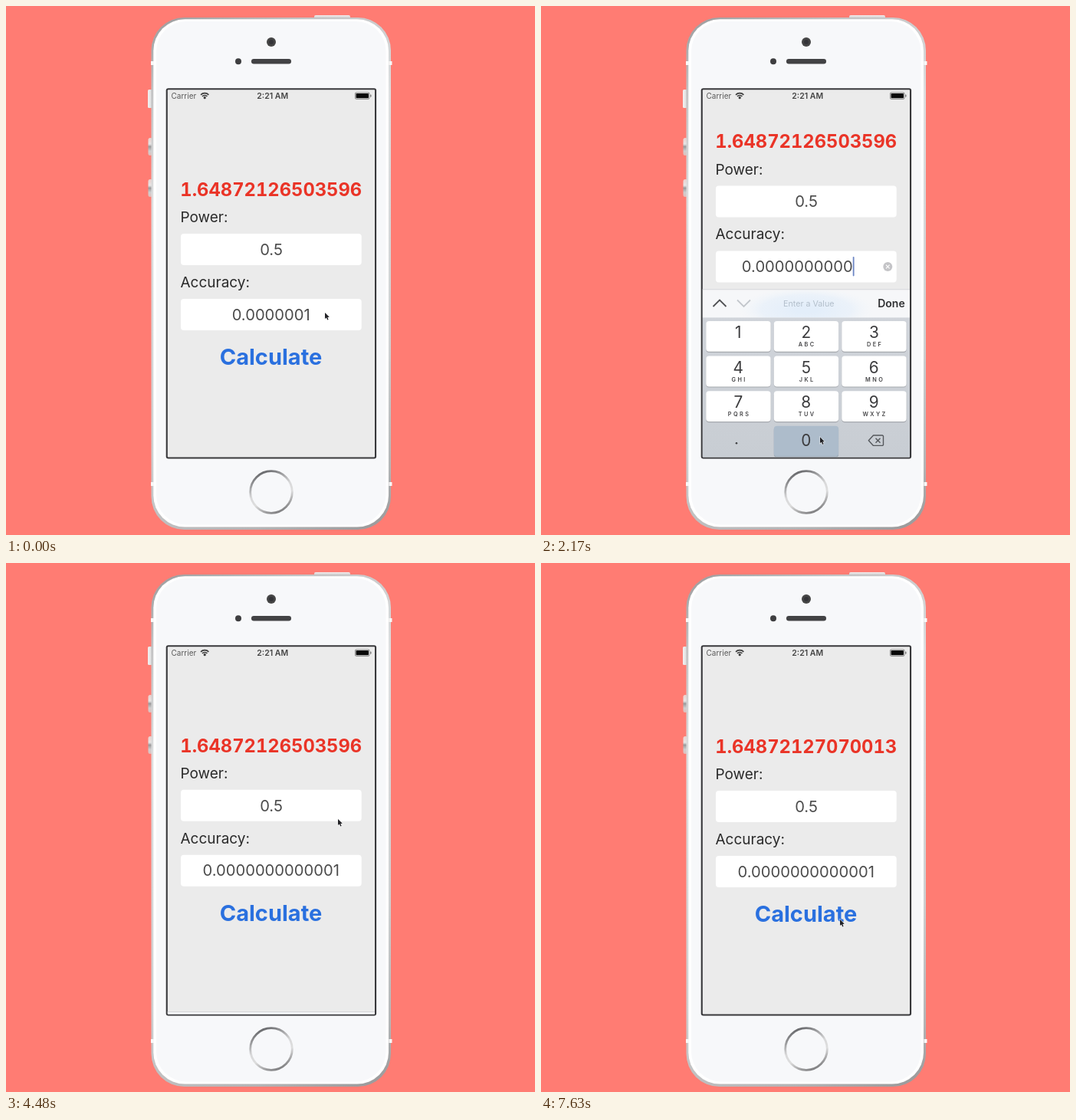
An HTML page with a canvas that plays this animation: 690 by 690 pixels, repeating every 7700 ms.

```html
<!DOCTYPE html>
<html lang="en">
<head>
<meta charset="utf-8">
<title>Power calculator</title>
<style>
  html, body { margin: 0; width: 100%; height: 100%; overflow: hidden; background: #ff7c73; }
  canvas { display: block; width: 690px; height: 690px; }
  #result {
    position: absolute; left: 345.8px; top: 224.8px;
    font: 700 100px/30px Inter, sans-serif;
    font-variant-numeric: tabular-nums;
    white-space: nowrap; color: #ea3427;
  }
</style>
</head>
<body>
<canvas id="stage"></canvas>
<div id="result">1.64872126503596</div>
<script>
const SIZE = 690, LOOP = 7700, STEP = 70;
const canvas = document.getElementById('stage');
const ctx = canvas.getContext('2d');
const dpr = window.devicePixelRatio || 1;
canvas.width = canvas.height = SIZE * dpr;

// The result label shrinks its type to its own width
const LABEL_WIDTH = 237;
const result = document.getElementById('result');
result.style.fontSize = 100 * LABEL_WIDTH / result.getBoundingClientRect().width + 'px';

// Timeline in ms
const OPEN = 20, OPEN_MS = 390, CLOSE = 4100, CLOSE_MS = 520;
const DELETE_AT = 880, ONE_AT = 3080, TAP_MS = 130;
const ZERO_AT = [1470, 1680, 1890, 2130, 2380, 2590];
const PRESS_AT = 5660, RELEASE_AT = 5810, FADE_MS = 320;
const POINTER = [
  [0, 416, 400], [140, 416, 401], [420, 428, 459], [770, 437, 565], [980, 437, 565],
  [1370, 364, 563], [2680, 364, 562], [3010, 258, 428], [3220, 258, 428],
  [3600, 432, 332], [4480, 433, 334], [4760, 430, 345], [5500, 388, 457],
  [6200, 388, 458], [7000, 390, 465], [7700, 390, 465]
];

const clamp = v => Math.max(0, Math.min(1, v));
const easeOut = p => 1 - (1 - clamp(p)) ** 3;
const smooth = p => p * p * (3 - 2 * p);

function box(x, y, w, h, r, fill) {
  ctx.beginPath();
  ctx.roundRect(x, y, w, h, r);
  ctx.fillStyle = fill;
  ctx.fill();
}

function disc(x, y, r, fill) {
  ctx.beginPath();
  ctx.arc(x, y, r, 0, Math.PI * 2);
  ctx.fillStyle = fill;
  ctx.fill();
}

function line(points, color, width) {
  ctx.beginPath();
  points.forEach(([x, y]) => ctx.lineTo(x, y));
  ctx.strokeStyle = color;
  ctx.lineWidth = width;
  ctx.stroke();
}

function text(str, x, y, size, color, { weight = 400, align = 'center', spacing = 0 } = {}) {
  ctx.font = `${weight} ${size}px Inter, sans-serif`;
  ctx.letterSpacing = spacing + 'px';
  ctx.textAlign = align;
  ctx.fillStyle = color;
  ctx.fillText(str, x, y);
  return ctx.measureText(str).width;
}

function gradient(x0, y0, x1, y1, ...stops) {
  const g = ctx.createLinearGradient(x0, y0, x1, y1);
  stops.forEach(([at, color]) => g.addColorStop(at, color));
  return g;
}

function drawPhone() {
  ctx.fillStyle = '#ff7c73';
  ctx.fillRect(0, 0, SIZE, SIZE);

  box(185, 109, 6, 24, 1.5, gradient(185, 0, 191, 0, [0, '#f3f1f1'], [0.6, '#e4e4e4'], [1, '#b5b5b6']));
  [172, 226].forEach(y => box(185.5, y, 5.5, 23, 2.5,
    gradient(0, y, 0, y + 23, [0, '#eccfcc'], [0.35, '#e6e6e6'], [0.5, '#9b9b9c'], [0.75, '#cfcfd0'], [1, '#e3bcb9'])));
  box(402, 12, 47, 6, 2, gradient(0, 12, 0, 17, [0, '#f4eeee'], [1, '#bdbdbd']));

  box(189.5, 15, 312.5, 668, 43, gradient(190, 15, 502, 683,
    [0, '#9b9b9c'], [0.12, '#c4c4c5'], [0.3, '#dededf'], [0.7, '#cfcfd0'], [0.9, '#b4b4b5'], [1, '#969697']));
  box(192.3, 17.3, 306.7, 662.2, 41, '#ffffff');
  box(196, 20, 299.5, 656.5, 39, '#f7f8fa');
  [72, 621].forEach(y => {
    box(189, y, 4, 5, 0, '#f8f8f8');
    box(499.5, y, 4, 5, 0, '#f8f8f8');
  });

  disc(346, 47, 6, '#454545');
  disc(346, 47, 3, '#343438');
  disc(303, 72.3, 4, '#3e3e40');
  box(320, 69, 52, 6.5, 3.2, '#424244');

  ctx.beginPath();
  ctx.arc(346, 634, 27.3, 0, Math.PI * 2);
  ctx.strokeStyle = gradient(335, 607, 357, 661, [0, '#66676a'], [0.45, '#d9d9da'], [0.65, '#dddddd'], [1, '#7b7b7d']);
  ctx.lineWidth = 2.8;
  ctx.stroke();

  box(208.7, 107.3, 274.4, 483.1, 3, '#38383b');
  box(210.8, 109.2, 270.2, 479.3, 1, '#ebebeb');
}

function drawStatusBar() {
  text('Carrier', 215.5, 121, 10, '#5b5b5b', { align: 'left' });
  text('2:21 AM', 347.7, 121, 10.5, '#444444', { weight: 600 });
  ctx.strokeStyle = '#3c3c3c';
  ctx.lineWidth = 1.7;
  [7.3, 4.5].forEach(r => {
    ctx.beginPath();
    ctx.arc(259.2, 121, r, -Math.PI * 0.75, -Math.PI * 0.25);
    ctx.stroke();
  });
  disc(259.2, 119.7, 1.6, '#3c3c3c');
  box(455, 112.5, 19.5, 9.2, 2.2, '#777777');
  box(455.8, 113.3, 17.9, 7.6, 1.6, '#ebebeb');
  box(456.5, 114, 16.5, 6.2, 1, '#080808');
  box(475.2, 115.5, 1.3, 3.2, 0.6, '#777777');
}

function accuracyAt(t) {
  if (t < DELETE_AT) return '0.0000001';
  const zeros = 6 + ZERO_AT.filter(at => t >= at).length;
  return '0.' + '0'.repeat(zeros) + (t >= ONE_AT ? '1' : '');
}

function drawForm(t, shift, editing) {
  result.textContent = t < RELEASE_AT ? '1.64872126503596' : '1.64872127070013';
  result.style.transform = `translate(-50%, ${-shift}px)`;

  ctx.save();
  ctx.translate(0, -shift);
  text('Power:', 227.5, 282.3, 19, '#2a2a2a', { align: 'left' });
  box(228, 297, 235.7, 41, 4, '#ffffff');
  text('0.5', 346, 324.8, 20.2, '#4b4b4b');
  text('Accuracy:', 227.5, 367, 19, '#2a2a2a', { align: 'left' });
  box(228, 382, 235.7, 41, 4, '#ffffff');

  const middle = editing ? 334.3 : 345.7;
  const width = text(accuracyAt(t), middle, 409.6, 20.2, '#4b4b4b');
  if (editing) {
    box(middle + width / 2, 389.5, 1.8, 25.5, 0.8, '#6d86c4');
    disc(452.3, 402.6, 6, '#c4c4c7');
    line([[450, 400.3], [454.6, 404.9]], '#ffffff', 1.2);
    line([[454.6, 400.3], [450, 404.9]], '#ffffff', 1.2);
  }

  if (t >= PRESS_AT) ctx.globalAlpha = 0.2 + 0.8 * clamp((t - RELEASE_AT) / FADE_MS);
  text('Calculate', 345.5, 468, 29, '#2a70df', { weight: 700 });
  ctx.restore();
}

function drawKey(x, y, label, letters, pressed) {
  box(x, y + 1, 84.3, 40, 4, pressed ? '#96a2ae' : '#a6a9ae');
  box(x, y, 84.3, 39.8, 4, pressed ? '#adbccb' : '#ffffff');
  const mid = x + 42;
  text(label, mid, y + (label === '0' ? 26.3 : 22), 20.8, '#3c3c3e');
  if (letters) text(letters, mid + 1.3, y + 33.2, 7.3, '#454547', { weight: 600, spacing: 2.4 });
}

function drawKeyboard(t, drop) {
  const down = at => t >= at && t < at + TAP_MS;
  ctx.save();
  ctx.beginPath();
  ctx.rect(210.8, 109.2, 270.2, 479.3);
  ctx.clip();
  ctx.translate(0, drop);

  box(210, 369.5, 272, 37, 0, '#f6f7f9');
  // Blurred tint of the button lying behind the bar
  ctx.save();
  ctx.beginPath();
  ctx.rect(210, 370, 272, 36.5);
  ctx.clip();
  ctx.translate(346, 396);
  ctx.scale(1, 0.33);
  const tint = ctx.createRadialGradient(0, 0, 15, 0, 0, 88);
  tint.addColorStop(0, 'rgba(225,237,250,.9)');
  tint.addColorStop(0.6, 'rgba(229,239,250,.65)');
  tint.addColorStop(1, 'rgba(240,245,250,0)');
  disc(0, 0, 88, tint);
  ctx.restore();
  box(210, 369.3, 272, 0.9, 0, '#d5d6d8');

  line([[224.5, 392], [233, 383.5], [241.5, 392]], '#505154', 1.8);
  line([[256, 383.5], [264.5, 392], [273, 383.5]], '#c3c7cc', 1.8);
  text('Enter a Value', 349.3, 391.5, 10.7, '#b3bfcb');
  text('Done', 474.7, 392.8, 14, '#303133', { weight: 600, align: 'right' });

  box(210, 406.5, 272, 184, 0, gradient(0, 406, 0, 590, [0, '#d0d4da'], [1, '#c8cdd3']));
  const letters = ['', 'ABC', 'DEF', 'GHI', 'JKL', 'MNO', 'PQRS', 'TUV', 'WXYZ'];
  letters.forEach((group, i) => {
    const x = 215.3 + (i % 3) * 88.5;
    const y = 411 + Math.floor(i / 3) * 45.6;
    drawKey(x, y, String(i + 1), group, i === 0 && down(ONE_AT));
  });
  drawKey(303.8, 547.8, '0', '', ZERO_AT.some(down));
  disc(255, 570.3, 1.3, '#3f4042');

  if (down(DELETE_AT - 60)) box(392.3, 547.8, 84.3, 39.8, 4, '#ffffff');
  const ink = '#55585c';
  ctx.lineJoin = 'round';
  line([[427.3, 566.7], [433.5, 560], [445.5, 560], [446.5, 561], [446.5, 572.4], [445.5, 573.4],
    [433.5, 573.4], [427.3, 566.7], [433.5, 560]], ink, 1.4);
  line([[436.5, 563.7], [442.5, 569.7]], ink, 1.4);
  line([[442.5, 563.7], [436.5, 569.7]], ink, 1.4);
  ctx.restore();
}

function drawPointer(t) {
  const i = POINTER.findIndex(p => p[0] > t);
  const [t0, x0, y0] = POINTER[i - 1];
  const [t1, x1, y1] = POINTER[i];
  const p = smooth((t - t0) / (t1 - t0));
  ctx.save();
  ctx.translate(x0 + (x1 - x0) * p, y0 + (y1 - y0) * p);
  ctx.beginPath();
  [[0, 0], [0, 8], [1.9, 6.4], [3.2, 9.6], [4.6, 9], [3.3, 6], [5.8, 5.8]].forEach(q => ctx.lineTo(...q));
  ctx.closePath();
  ctx.strokeStyle = 'rgba(255,255,255,.7)';
  ctx.lineWidth = 1.2;
  ctx.stroke();
  ctx.fillStyle = '#222226';
  ctx.fill();
  ctx.restore();
}

function render(now) {
  const t = Math.floor((now % LOOP) / STEP) * STEP;
  const up = easeOut((t - OPEN) / OPEN_MS) - easeOut((t - CLOSE) / CLOSE_MS);
  ctx.setTransform(dpr, 0, 0, dpr, 0, 0);
  drawPhone();
  drawStatusBar();
  drawForm(t, 62.6 * up, t >= OPEN && t < CLOSE);
  if (up > 0) drawKeyboard(t, 220 * (1 - up));
  drawPointer(t);
}

let start;
function tick(now) {
  start ??= now;
  render(now - start);
  requestAnimationFrame(tick);
}
render(0);
requestAnimationFrame(tick);
</script>
</body>
</html>
```
